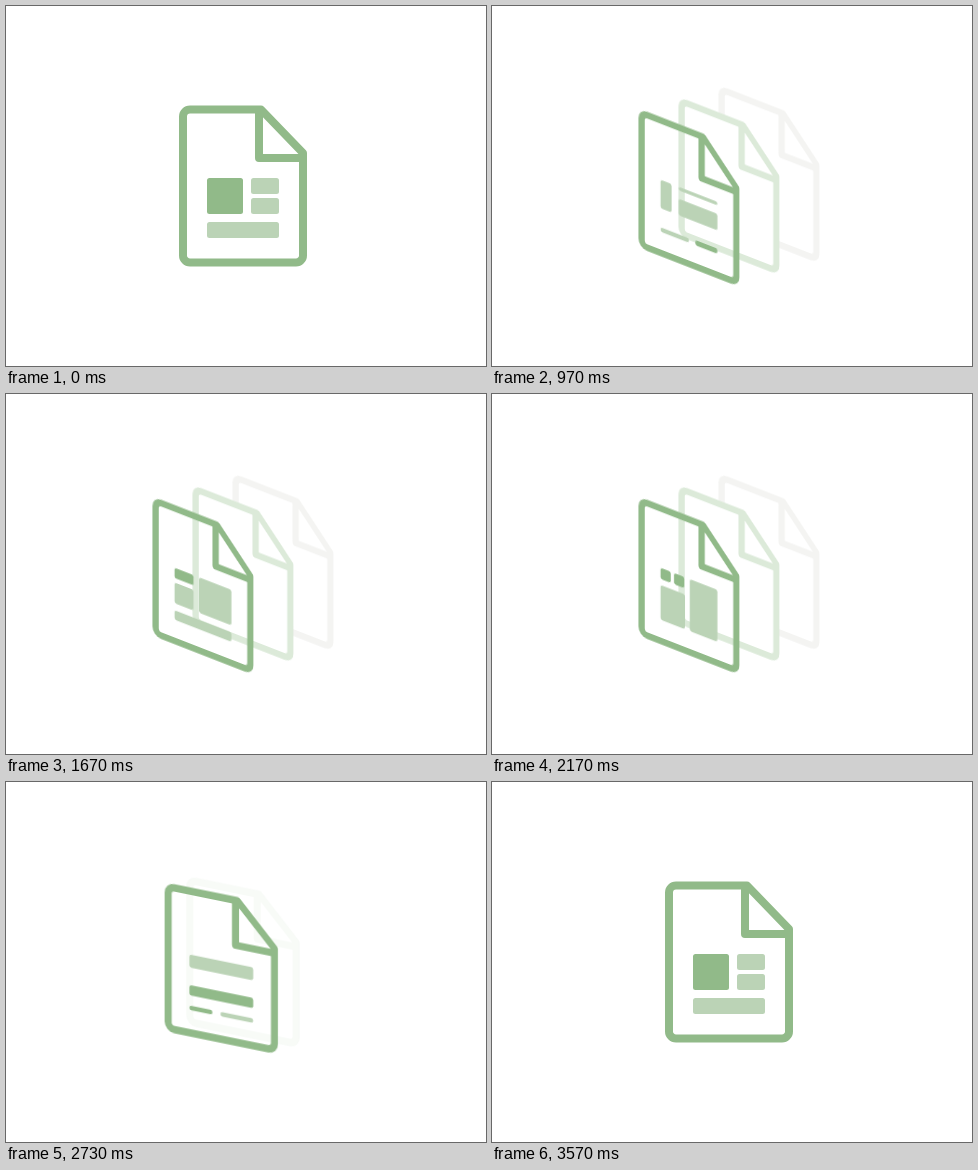
These frames come from a looping animation (480 px wide and 360 px high, 3610 ms). An HTML page without scripts:

```html
<!DOCTYPE html>
<html lang="en">
<head>
<meta charset="utf-8">
<title>Document layouts</title>
<style>
  :root { --main: #91ba89; --soft: #bbd3b6; }
  html, body { margin: 0; width: 100%; height: 100%; overflow: hidden; background: #fff; }
  svg { display: block; width: 100vw; height: 100vh; }

  .sheet { transform-origin: 237px 180px; animation: tilt 3610ms infinite; }
  .front { --x: -40px; --y: 11.7px; stroke: var(--main); }
  .middle { --x: 0px; --y: 0px; stroke: #dcead9; }
  .back { --x: 40px; --y: -11.7px; stroke: #f4f4f2; }
  .page { fill: none; stroke-width: 8; stroke-linejoin: round; }
  .middle .page { fill: #fff; }
  .middle .page, .back .page { animation: 3610ms infinite; }
  .middle .page { animation-name: show-middle; }
  .back .page { animation-name: show-back; }

  @keyframes tilt {
    0%, 4.16% {
      transform: translate(0, 0) skewY(0deg) scale(1, 1);
      animation-timing-function: cubic-bezier(.65, 0, .35, 1);
    }
    20.5%, 72.02% {
      transform: translate(var(--x), var(--y)) skewY(21.3deg) scale(.79, .866);
      animation-timing-function: cubic-bezier(.65, 0, .35, 1);
    }
    79.5%, 100% { transform: translate(0, 0) skewY(0deg) scale(1, 1); }
  }
  @keyframes show-middle {
    0%, 5% { opacity: 0; }
    16%, 73.5% { opacity: 1; }
    78%, 100% { opacity: 0; }
  }
  @keyframes show-back {
    0%, 11% { opacity: 0; }
    16%, 73% { opacity: 1; }
    75.5%, 100% { opacity: 0; }
  }

  /* Each block moves through the page layouts in turn. */
  rect { rx: 2.5px; stroke: none; fill: var(--soft); animation: 3610ms ease-in-out infinite; }
  .b1 { animation-name: b1; }
  .b2 { animation-name: b2; }
  .b3 { animation-name: b3; }
  .b4 { animation-name: b4; }
  .b5 { animation-name: b5; }

  @keyframes b1 {
    0%, 3%, 89.5%, 100% { x: 201px; y: 172px; width: 36px; height: 36px; fill: var(--main); }
    16.62% { x: 201px; y: 172px; width: 36px; height: 16px; fill: var(--soft); }
    26.87% { x: 201px; y: 172px; width: 14px; height: 33px; fill: var(--soft); }
    46.26% { x: 201px; y: 172px; width: 24px; height: 12px; fill: var(--main); }
    60.11% { x: 201px; y: 172px; width: 13px; height: 13px; fill: var(--main); }
    75.62% { x: 201px; y: 172px; width: 72px; height: 14px; fill: var(--soft); }
  }
  @keyframes b2 {
    0%, 3%, 89.5%, 100% { x: 245px; y: 172px; width: 28px; height: 16px; fill: var(--soft); }
    16.62% { x: 245px; y: 172px; width: 28px; height: 36px; fill: var(--main); }
    26.87% { x: 224px; y: 172px; width: 49px; height: 4px; fill: var(--soft); }
    46.26% { x: 232px; y: 172px; width: 41px; height: 41px; fill: var(--soft); }
    60.11% { x: 238px; y: 172px; width: 35px; height: 60px; fill: var(--soft); }
    75.62% { x: 201px; y: 205px; width: 72px; height: 11px; fill: var(--main); }
  }
  @keyframes b3 {
    0%, 3%, 89.5%, 100% { x: 245px; y: 192px; width: 28px; height: 16px; fill: var(--soft); }
    16.62% { x: 201px; y: 192px; width: 36px; height: 16px; fill: var(--soft); }
    26.87% { x: 224px; y: 186px; width: 49px; height: 19px; fill: var(--soft); }
    46.26% { x: 201px; y: 189px; width: 24px; height: 24px; fill: var(--soft); }
    60.11% { x: 201px; y: 192px; width: 31px; height: 40px; fill: var(--soft); }
    75.62% { x: 201px; y: 227px; width: 26px; height: 5px; fill: var(--main); }
  }
  @keyframes b4 {
    0%, 16.62%, 89.5%, 100% { x: 201px; y: 216px; width: 72px; height: 16px; fill: var(--soft); }
    26.87% { x: 201px; y: 227px; width: 36px; height: 5px; fill: var(--soft); }
    46.26% { x: 201px; y: 221px; width: 72px; height: 11px; fill: var(--soft); }
    60.11% { x: 218px; y: 172px; width: 13px; height: 13px; fill: var(--main); }
    75.62% { x: 236px; y: 227px; width: 37px; height: 5px; fill: var(--soft); }
  }
  @keyframes b5 {
    0%, 16.62%, 46.26%, 100% { x: 273px; y: 221px; width: 0px; height: 11px; fill: var(--soft); }
    26.87% { x: 245px; y: 226px; width: 28px; height: 6px; fill: var(--main); }
  }
</style>
</head>
<body>
<svg viewBox="0 0 480 360">
  <defs>
    <path id="page" d="M255 103.5H184a7 7 0 0 0-7 7V249.5a7 7 0 0 0 7 7H290a7 7 0 0 0 7-7V147L255 103.5H253V152H297"/>
  </defs>
  <g class="sheet back"><use class="page" href="#page"/></g>
  <g class="sheet middle"><use class="page" href="#page"/></g>
  <g class="sheet front">
    <use class="page" href="#page"/>
    <rect class="b1"/>
    <rect class="b2"/>
    <rect class="b3"/>
    <rect class="b4"/>
    <rect class="b5"/>
  </g>
</svg>
</body>
</html>
```
